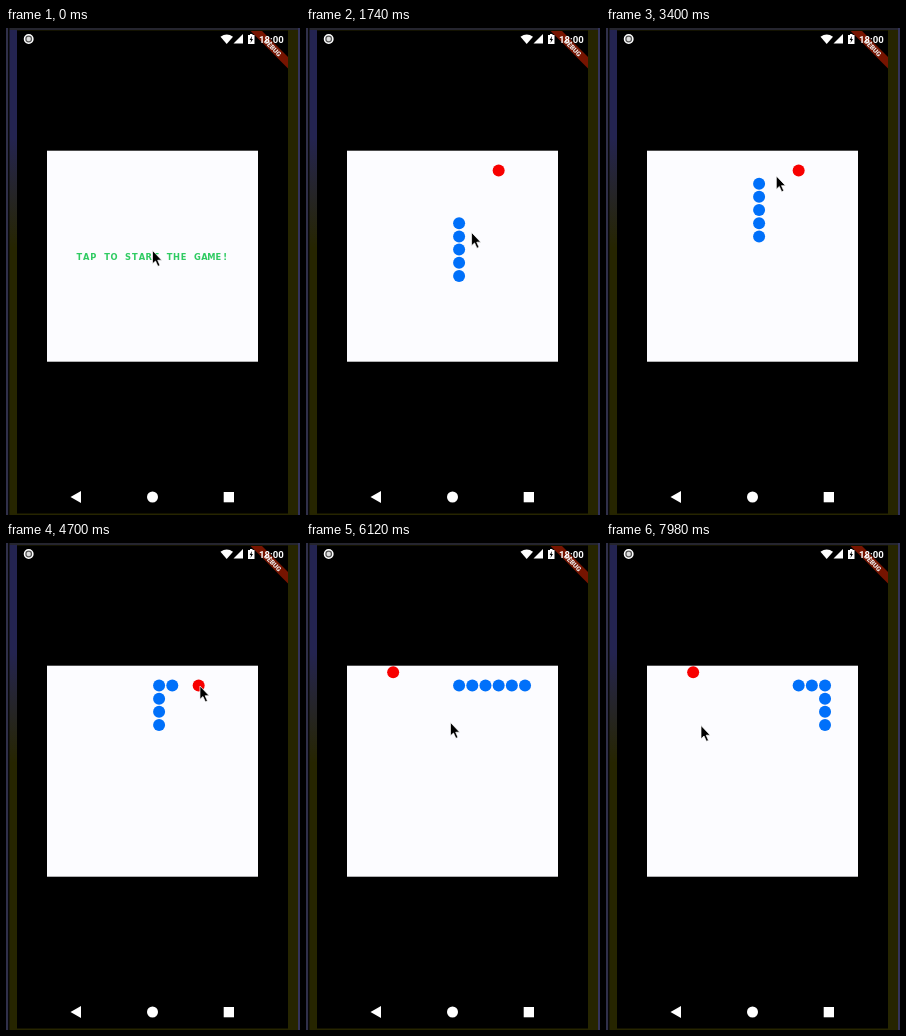
Animation of 294x487 px, one loop 8000 ms. Source, as an HTML page:

```html
<!DOCTYPE html>
<html lang="en">
<head>
<meta charset="utf-8">
<title>Snake</title>
<style>
  html, body { margin: 0; width: 100%; height: 100%; overflow: hidden; background: #000; }
  svg { display: block; width: 100vw; height: 100vh; }
  .prompt { font: bold 8.3px "DejaVu Sans", sans-serif; fill: #2fcb62; text-anchor: middle; }
  .clock { font: 700 9.6px Roboto, sans-serif; fill: #fff; }
  .debug { font: 900 6.7px Roboto, sans-serif; fill: #eee; text-anchor: middle; }
</style>
</head>
<body>
<svg viewBox="0 0 294 487">
  <defs>
    <linearGradient id="leftEdge" x2="0" y2="1">
      <stop offset="0" stop-color="#242450"/>
      <stop offset=".5" stop-color="#242450"/>
      <stop offset="1" stop-color="#262500"/>
    </linearGradient>
  </defs>

  <!-- desktop edges and phone screen -->
  <rect width="294" height="487" fill="#262500"/>
  <rect width="11" height="220" fill="url(#leftEdge)"/>
  <rect width="294" height="2" fill="#25252f"/>
  <rect width="2" height="487" fill="#30304a"/>
  <rect x="2" width="1.5" height="487" fill="#080808"/>
  <rect x="292" width="2" height="487" fill="#33335a"/>
  <rect x="11" y="2.5" width="271" height="483" fill="#000"/>

  <!-- corner banner -->
  <path d="M244.6 3H256L282 29V40.4Z" fill="#761400"/>
  <text class="debug" transform="translate(266.7 19.700) rotate(45)" y="2.4">DEBUG</text>

  <!-- status bar -->
  <circle cx="22.700" cy="11" r="4.200" fill="#555" stroke="#fff" stroke-width="1.500"/>
  <circle cx="22.700" cy="11" r="2.200" fill="#ddd"/>
  <g fill="#fff">
    <path d="M214.500 8.800Q220.700 4 227 8.800L220.700 16Z"/>
    <path d="M237 6V15.500H227.500Z"/>
    <path d="M242 7H244V6H246.500V7H248.500V16H242Z"/>
  </g>
  <path d="M246 8L243.700 12H245L244.500 15L247 11H245.600Z" fill="#000"/>
  <text class="clock" x="253" y="14.700">18:00</text>

  <!-- navigation bar -->
  <g fill="#fff">
    <path d="M64.500 469L75 463V475Z"/>
    <circle cx="146.500" cy="469" r="5.500"/>
    <rect x="217.700" y="464" width="10.300" height="10.300"/>
  </g>

  <rect x="41" y="122.700" width="211" height="211" fill="#fcfcff"/>
  <text class="prompt" id="prompt" y="232.300">TAP TO START THE GAME!</text>
  <g id="game">
    <circle id="food" r="6" fill="#f80000"/>
    <g id="snake" fill="#0070fa"></g>
  </g>
  <path id="cursor" d="M0 0V13.300L3 10.500L5.400 15.800L7.500 14.900L5.200 9.700H9.200Z"
        fill="#000" stroke="#fff" stroke-width=".7"/>
</svg>
<script>
const LOOP = 8000, START = 120, TICK = 580, EAT_TICK = 9, LENGTH = 5, CELL = 211 / 16;

// time, x, y of the pointer tip
const POINTER = [
  [0, 146.5, 222.5], [300, 146.5, 222.5], [1740, 165.5, 204.5], [2500, 209.5, 147.5],
  [3500, 166, 148], [4700, 194, 143], [6120, 144.5, 179.5], [7320, 128.5, 189],
  [7980, 95, 182.5], [8000, 95, 182.5]
];

const byId = id => document.getElementById(id);
const clamp = (v, lo, hi) => Math.min(Math.max(v, lo), hi);

function place(dot, col, row) {
  dot.setAttribute("cx", 41 + (col + .5) * CELL);
  dot.setAttribute("cy", 122.7 + (row + .5) * CELL);
}

// The route runs up column 8, right along row 1, then down column 13.
const routeCol = i => clamp(i - 2, 8, 13);
const routeRow = i => i <= 10 ? 11 - i : Math.max(1, i - 14);

const dots = Array.from({ length: LENGTH + 1 }, () => {
  const dot = document.createElementNS("http://www.w3.org/2000/svg", "circle");
  dot.setAttribute("r", 6);
  return byId("snake").appendChild(dot);
});

// Evenly pitched letters, as in a console font.
const prompt = byId("prompt");
prompt.setAttribute("x", [...prompt.textContent].map((_, i) => 73.3 + 6.95 * i).join(" "));

function pointerAt(t) {
  const next = POINTER.findIndex(key => key[0] > t);
  const [t0, x0, y0] = POINTER[next - 1], [t1, x1, y1] = POINTER[next];
  const k = (t - t0) / (t1 - t0);
  return [x0 + (x1 - x0) * k, y0 + (y1 - y0) * k];
}

function draw(t) {
  const playing = t >= START;
  const tick = Math.max(0, Math.floor((t - START) / TICK));
  const eaten = tick >= EAT_TICK;

  prompt.style.display = playing ? "none" : "";
  byId("game").style.display = playing ? "" : "none";
  place(byId("food"), eaten ? 3 : 11, eaten ? 0 : 1);
  dots.forEach((dot, i) => {
    dot.style.display = i < LENGTH || eaten ? "" : "none";
    place(dot, routeCol(tick + i), routeRow(tick + i));
  });
  byId("cursor").setAttribute("transform", `translate(${pointerAt(t)})`);
}

const origin = performance.now();
function frame() {
  draw((performance.now() - origin) % LOOP);
  requestAnimationFrame(frame);
}
frame();
</script>
</body>
</html>
```
